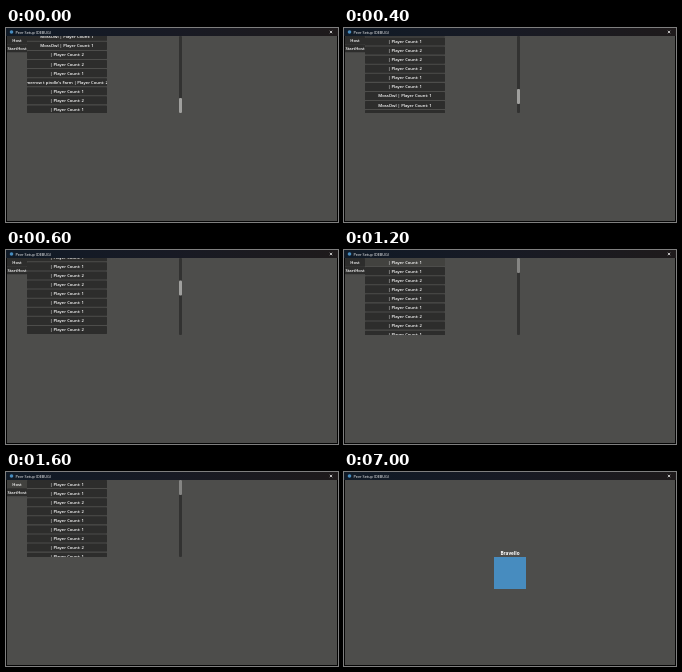
An HTML page with a canvas for the animation above (8 s loop, 332x194 px).

```html
<!DOCTYPE html>
<html lang="en">
<head>
<meta charset="utf-8">
<title>Lobby list</title>
<style>
  html, body { margin: 0; width: 100%; height: 100%; overflow: hidden; background: #4d4d4b; }
  canvas { display: block; width: 332px; height: 194px; }
</style>
</head>
<body>
<canvas id="stage" width="332" height="194"></canvas>
<script>
const ctx = document.getElementById('stage').getContext('2d');
const LOOP = 8000;
const FONT = '"Open Sans", "Noto Sans", sans-serif';
const NORMAL = '#2d2d2c', HOVER = '#42423f', EDGE = '#050505';

// Scrolling list geometry
const LIST = { x: 21, y: 8, w: 80, h: 77, pitch: 9.08, rowH: 8.05 };
const BAR = { x: 173, w: 3, grabber: 15 };
const ROWS = 54;
const MAX_SCROLL = 12.1 + (ROWS - 1) * LIST.pitch - 81.5;

const HEAD = '112211221';
const TAIL = '122211112212121';
const NAMES = {
  [ROWS - 9]: 'MossOwl ',
  [ROWS - 8]: 'MossOwl ',
  [ROWS - 4]: "merrow t pindle's Farm "
};

function playerCount(i) {
  if (i < HEAD.length) return HEAD[i];
  const tailStart = ROWS - TAIL.length;
  if (i >= tailStart) return TAIL[i - tailStart];
  return i % 5 < 3 ? '1' : '2';
}

const rowText = i => (NAMES[i] || '') + '| Player Count: ' + playerCount(i);

// The drag is sampled in hard steps of 200 ms
function scrollAt(t) {
  const steps = [MAX_SCROLL, MAX_SCROLL - 3.1, MAX_SCROLL - 59.2, 150, 0];
  return steps[Math.min(Math.floor(t / 200), steps.length - 1)];
}

function box(x, y, w, h, color, radius = 0) {
  ctx.fillStyle = color;
  ctx.beginPath();
  ctx.roundRect(x, y, w, h, radius);
  ctx.fill();
}

function text(label, x, y, { size = 4.2, align = 'center', weight = 600 } = {}) {
  ctx.font = `${weight} ${size}px ${FONT}`;
  ctx.textAlign = align;
  ctx.fillStyle = '#ffffff';
  ctx.fillText(label, x, y + 1.5);
}

function button(label, x, y, w, hovered) {
  box(x, y, w, LIST.rowH, hovered ? HOVER : NORMAL, 0.6);
  text(label, x + w / 2, y + LIST.rowH / 2);
}

function drawWindow() {
  const title = ctx.createLinearGradient(0, 0, 332, 0);
  title.addColorStop(0, '#101a26');
  title.addColorStop(0.5, '#181a24');
  title.addColorStop(1, '#1e1a1b');

  box(0, 0, 332, 194, '#4d4d4b');
  box(0, 0, 332, 8, title);
  box(0, 8, 1, 186, EDGE);
  box(331, 8, 1, 186, EDGE);
  box(0, 193, 332, 1, EDGE);

  ctx.fillStyle = '#478cbf';
  ctx.beginPath();
  ctx.arc(5.5, 4, 1.8, 0, Math.PI * 2);
  ctx.fill();
  text('Peer Setup (DEBUG)', 9.5, 4, { size: 3.8, align: 'left', weight: 500 });

  ctx.strokeStyle = '#ffffff';
  ctx.lineWidth = 0.7;
  ctx.beginPath();
  ctx.moveTo(323.8, 2.8);
  ctx.lineTo(326.2, 5.2);
  ctx.moveTo(326.2, 2.8);
  ctx.lineTo(323.8, 5.2);
  ctx.stroke();
}

function drawList(t) {
  const scroll = scrollAt(t);
  const rowHovered = t >= 1200 && t < 1600;

  ctx.save();
  ctx.beginPath();
  ctx.rect(LIST.x, LIST.y, LIST.w, LIST.h);
  ctx.clip();
  for (let i = 0; i < ROWS; i++) {
    const y = LIST.y + i * LIST.pitch - scroll;
    if (y > LIST.y + LIST.h || y + LIST.rowH < LIST.y) continue;
    button(rowText(i), LIST.x, y, LIST.w, rowHovered && i === 0);
  }
  ctx.restore();

  const travel = LIST.h - BAR.grabber;
  const grabberY = LIST.y + scroll / MAX_SCROLL * travel;
  const grabberColor = t < 1000 ? '#a0a09e' : t < 1200 ? '#b8b8b6' : '#858583';
  box(BAR.x, LIST.y, BAR.w, LIST.h, '#323231', 1);
  box(BAR.x, grabberY, BAR.w, BAR.grabber, grabberColor, 1);
}

function drawLobby(t) {
  button('Host', 1, 8, 20, t >= 1600);
  button('StartHost', 1, 8 + 8.3, 20, false);
  drawList(t);
}

function drawPlayer() {
  text('Bravello', 166, 81, { size: 4.7, weight: 700 });
  box(150, 85, 32, 32, '#478cbf');
}

function frame(now) {
  const t = now % LOOP;
  drawWindow();
  if (t < 2600) drawLobby(t);
  else drawPlayer();
  requestAnimationFrame(frame);
}
requestAnimationFrame(frame);
</script>
</body>
</html>
```
